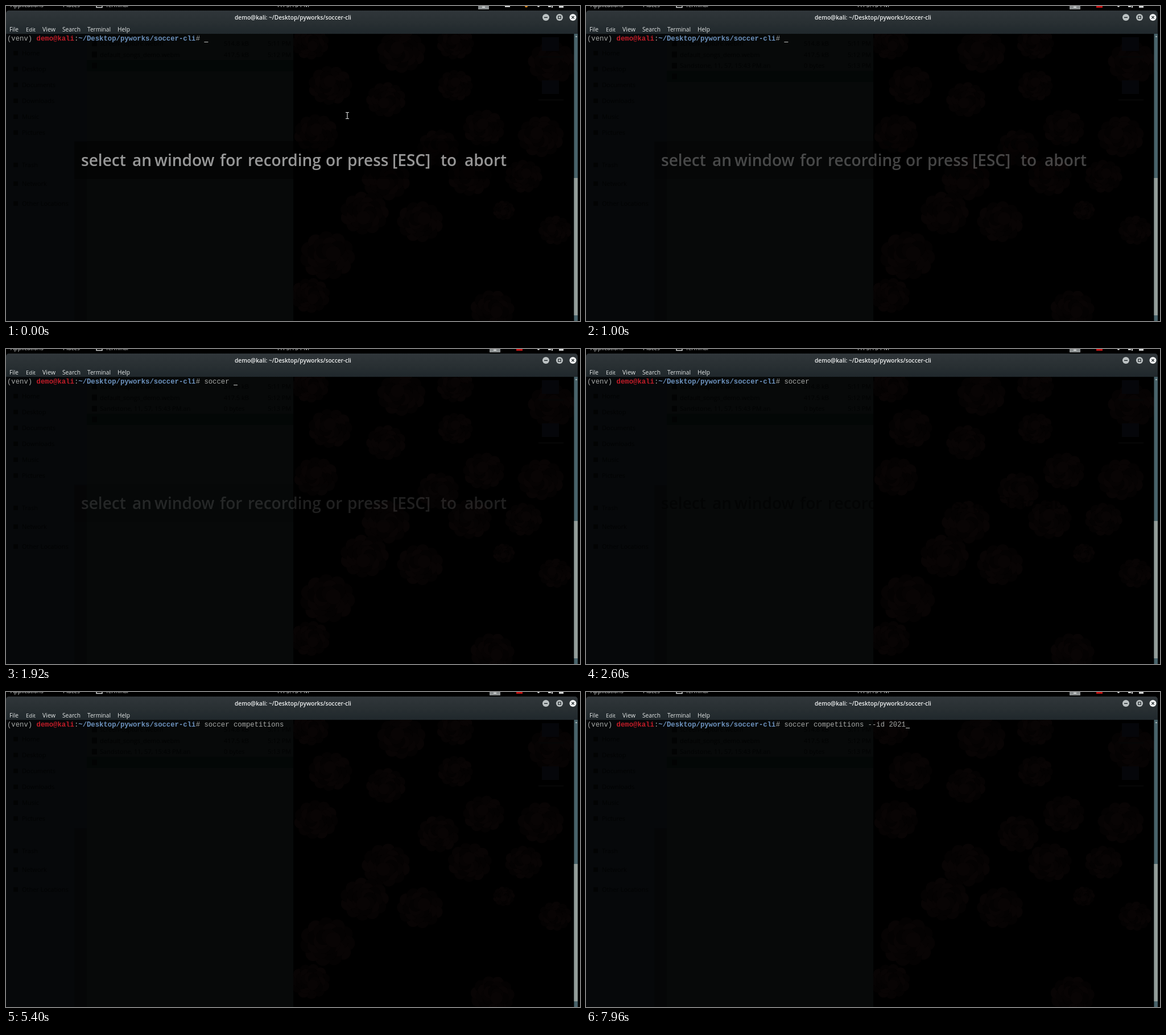
Animation of 1009x555 px, one loop 8 s. Source, as an HTML page with a canvas:

```html
<!DOCTYPE html>
<html lang="en">
<head>
<meta charset="utf-8">
<title>Terminal session</title>
<style>
html, body { margin: 0; width: 100%; height: 100%; overflow: hidden; background: #000; }
canvas { display: block; }
</style>
</head>
<body>
<canvas id="stage" width="1009" height="555"></canvas>
<script>
const W = 1009, H = 555, LOOP = 8000;
const SANS = '"Open Sans", "Noto Sans", sans-serif';
const MONO = '"Liberation Mono", "Courier New", monospace';
const CELL = 7.37, MONO_SIZE = CELL / 0.6;
const TRAY_CHANGE = 400;

const ctx = document.getElementById('stage').getContext('2d');

const clamp = v => Math.min(1, Math.max(0, v));

function rect(g, color, x, y, w, h) {
  g.fillStyle = color;
  g.fillRect(x, y, w, h);
}

function disc(g, color, x, y, r) {
  g.fillStyle = color;
  g.beginPath();
  g.arc(x, y, r, 0, Math.PI * 2);
  g.fill();
}

function text(g, str, x, y, size, color, weight = 400, family = SANS) {
  g.font = `${weight} ${size}px ${family}`;
  g.fillStyle = color;
  g.fillText(str, x, y);
}

// Font size at which a string is as wide as asked.
function sizeFor(g, str, width, weight = 400) {
  g.font = `${weight} 100px ${SANS}`;
  return 100 * width / g.measureText(str).width;
}

function label(g, str, x, y, width, color, weight) {
  text(g, str, x, y, sizeFor(g, str, width, weight), color, weight);
}

function flower(g, x, y, r) {
  for (let ring = 0; ring < 3; ring++) {
    const n = 11 - ring * 2, reach = r * (0.7 - ring * 0.24);
    for (let i = 0; i < n; i++) {
      const a = i * Math.PI * 2 / n + ring * 0.5 + x;
      disc(g, ['#040202', '#060303', '#080404'][(i + ring) % 3],
        x + Math.cos(a) * reach, y + Math.sin(a) * reach * 0.85, r * 0.27);
    }
  }
}

function drawDesktop(g) {
  rect(g, '#000', 0, 0, W, H);
  const flowers = [
    [535, 65, 34], [570, 140, 40], [545, 225, 40], [668, 165, 36], [695, 80, 44],
    [790, 140, 32], [790, 65, 34], [840, 215, 38], [760, 250, 38], [815, 300, 40],
    [668, 305, 44], [630, 365, 44], [728, 380, 42], [940, 230, 42], [910, 300, 34],
    [960, 100, 44], [565, 440, 50], [855, 535, 40], [965, 395, 30], [535, 510, 36],
    [875, 360, 20]
  ];
  flowers.forEach(f => flower(g, ...f));
  [66, 142].forEach(y => {
    rect(g, '#05060a', 942, y - 11, 30, 24);
    rect(g, '#050505', 936, y + 22, 44, 3);
  });

  rect(g, '#070909', 142, 49, 363, 506);
  rect(g, '#06080a', 0, 49, 142, 506);
  rect(g, '#050607', 120, 240, 22, 315);
  const places = [
    ['Home', 83], ['Desktop', 111], ['Documents', 139], ['Downloads', 167],
    ['Music', 195], ['Pictures', 223], ['Trash', 280], ['Network', 313],
    ['Other Locations', 348]
  ];
  places.forEach(([name, y]) => {
    rect(g, '#020303', 13, y - 4, 8, 8);
    text(g, name, 28, y + 4, 11, '#020303');
  });
}

function drawFrame(g) {
  const bar = g.createLinearGradient(0, 8, 0, 49);
  bar.addColorStop(0, '#30363a');
  bar.addColorStop(0.5, '#293033');
  bar.addColorStop(1, '#20282c');
  g.fillStyle = bar;
  g.beginPath();
  g.roundRect(0, 8, 1005, 41, [5, 5, 0, 0]);
  g.fill();

  label(g, 'demo@kali: ~/Desktop/pyworks/soccer-cli', 402, 24, 205, '#f0f2f2', 600);
  const menu = [['File', 6, 16], ['Edit', 35, 17], ['View', 64, 23],
    ['Search', 99, 32], ['Terminal', 143, 41], ['Help', 196, 22]];
  menu.forEach(([name, x, w]) => label(g, name, x, 45, w, '#e4e7e7'));

  disc(g, '#bcc2c3', 949, 20, 6);
  disc(g, '#bcc2c3', 973, 20, 6);
  disc(g, '#f2f4f4', 996.5, 20, 6);
  rect(g, '#2b3235', 946, 19.5, 6, 1.5);
  g.strokeStyle = '#2b3235';
  g.lineWidth = 1.3;
  g.strokeRect(970.8, 17.8, 4.4, 4.4);
  g.beginPath();
  g.moveTo(994.3, 17.8); g.lineTo(998.7, 22.2);
  g.moveTo(998.7, 17.8); g.lineTo(994.3, 22.2);
  g.stroke();

  rect(g, '#48636a', 998.5, 49, 6.5, 506);
  rect(g, '#929c99', 998.5, 303, 6.5, 242);
  rect(g, '#9aa8aa', 1001, 53, 3, 2);
}

function drawPanel(g) {
  const c = '#d4d6d6';
  label(g, 'Applications', 8, 2, 58, c);
  label(g, 'Places', 100, 2, 30, c);
  label(g, 'Terminal', 175, 2, 40, c);
  label(g, 'Fri 5:13 PM', 477, 2, 56, c);
  g.strokeStyle = c;
  g.lineWidth = 1.5;
  g.strokeRect(159, -6, 10, 8.5);
  disc(g, c, 936, 0, 2);
  rect(g, c, 953, 0, 5, 2);
  rect(g, c, 959, 0, 2, 3);
  rect(g, c, 972, 0, 8, 3);
}

// Static scenery is painted once.
const scenery = document.createElement('canvas');
scenery.width = W;
scenery.height = H;
const sg = scenery.getContext('2d');
drawDesktop(sg);
drawFrame(sg);
drawPanel(sg);

// Words of the notice and where each begins.
const NOTICE = [
  ['select', 132], ['an', 222], ['window', 261], ['for', 376], ['recording', 425],
  ['or', 562], ['press', 600], ['[ESC]', 679], ['to', 764], ['abort', 806]
];
const noticeSize = sizeFor(ctx, 'recording', 129, 600);

const COMMAND = 'soccer competitions --id 2021';
const KEYS = [
  1150, 1260, 1370, 1470, 1580, 1690, 1800,
  3300, 3450, 3580, 3680, 3800, 3920, 4040, 4160, 4260, 4380, 4480, 4580, 4700,
  6300, 6440, 6600, 6740, 6900, 7160, 7320, 7480, 7640
];

function drawFiles(late) {
  const ink = '#020303';
  const rows = [
    ['screen-capture.webm', '514.8 kB', '5:11 PM'],
    ['default_songs_demo.webm', '417.5 kB', '5:12 PM']
  ];
  if (late) rows.push(['Sandstone, 11, 57, 15:43 PM.an', '0 bytes', '5:13 PM']);
  rows.forEach((row, i) => {
    const y = 66 + i * 19.5;
    rect(ctx, ink, 151, y - 5, 9, 10);
    [165, 383, 460].forEach((x, k) => text(ctx, row[k], x, y + 4, 11, ink));
  });
  const y = late ? 114 : 95;
  rect(ctx, '#030706', 142, y, 363, 20);
  rect(ctx, ink, 151, y + 5, 9, 10);
}

function drawTray(late) {
  rect(ctx, '#8b8f90', late ? 850 : 830, 0, 19, 6);
  rect(ctx, '#d8dada', late ? 857 : 837, 1, 5, 2);
  if (late) {
    rect(ctx, '#c81414', 897, 0, 11, 3);
  } else {
    rect(ctx, '#d4d6d6', 877, 0, 9, 2);
    disc(ctx, '#e08a20', 914.5, 0, 2.5);
  }
}

function drawPointer() {
  ctx.lineWidth = 1.2;
  ctx.strokeStyle = '#d8dada';
  ctx.beginPath();
  ctx.moveTo(597, 187.5); ctx.lineTo(603, 187.5);
  ctx.moveTo(600, 187.5); ctx.lineTo(600, 198.5);
  ctx.moveTo(597, 198.5); ctx.lineTo(603, 198.5);
  ctx.stroke();
}

function drawNotice(t) {
  const fade = Math.exp(-t / 1250) * clamp((2450 - t) / 400);
  const shade = 0.5 * clamp((t - 2300) / 200) * clamp((3300 - t) / 500);
  rect(ctx, `rgba(0,0,0,${0.4 * fade})`, 120, 238, 770, 67);
  for (const [word, x] of NOTICE) {
    text(ctx, word, x, 282, noticeSize, `rgba(255,255,255,${0.59 * fade})`, 600);
    text(ctx, word, x, 282, noticeSize, `rgba(0,0,0,${shade})`, 600);
  }
}

function drawShell(t) {
  const plain = '#a6a8a6';
  const parts = [
    ['(venv) ', plain, 400], ['demo@kali', '#c01c28', 700], [':', plain, 400],
    ['~/Desktop/pyworks/soccer-cli', '#6c92be', 700], ['# ', plain, 400]
  ];
  const typed = KEYS.filter(k => k <= t).length;
  parts.push([COMMAND.slice(0, typed), plain, 400]);
  let col = 0;
  for (const [str, color, weight] of parts) {
    text(ctx, str, 2 + col * CELL, 61, MONO_SIZE, color, weight, MONO);
    col += str.length;
  }
  // The blink restarts with every key.
  const since = typed ? t - KEYS[typed - 1] : t + 200;
  if (since % 1200 < 600) rect(ctx, '#c8cac8', 2 + col * CELL, 63, 7, 1);
}

function draw(now) {
  const t = now % LOOP, late = t >= TRAY_CHANGE;
  ctx.drawImage(scenery, 0, 0);
  drawFiles(late);
  drawTray(late);
  drawNotice(t);
  drawShell(t);
  if (!late) drawPointer();
}

const start = performance.now();
function tick() {
  draw(performance.now() - start);
  requestAnimationFrame(tick);
}
tick();
</script>
</body>
</html>
```
